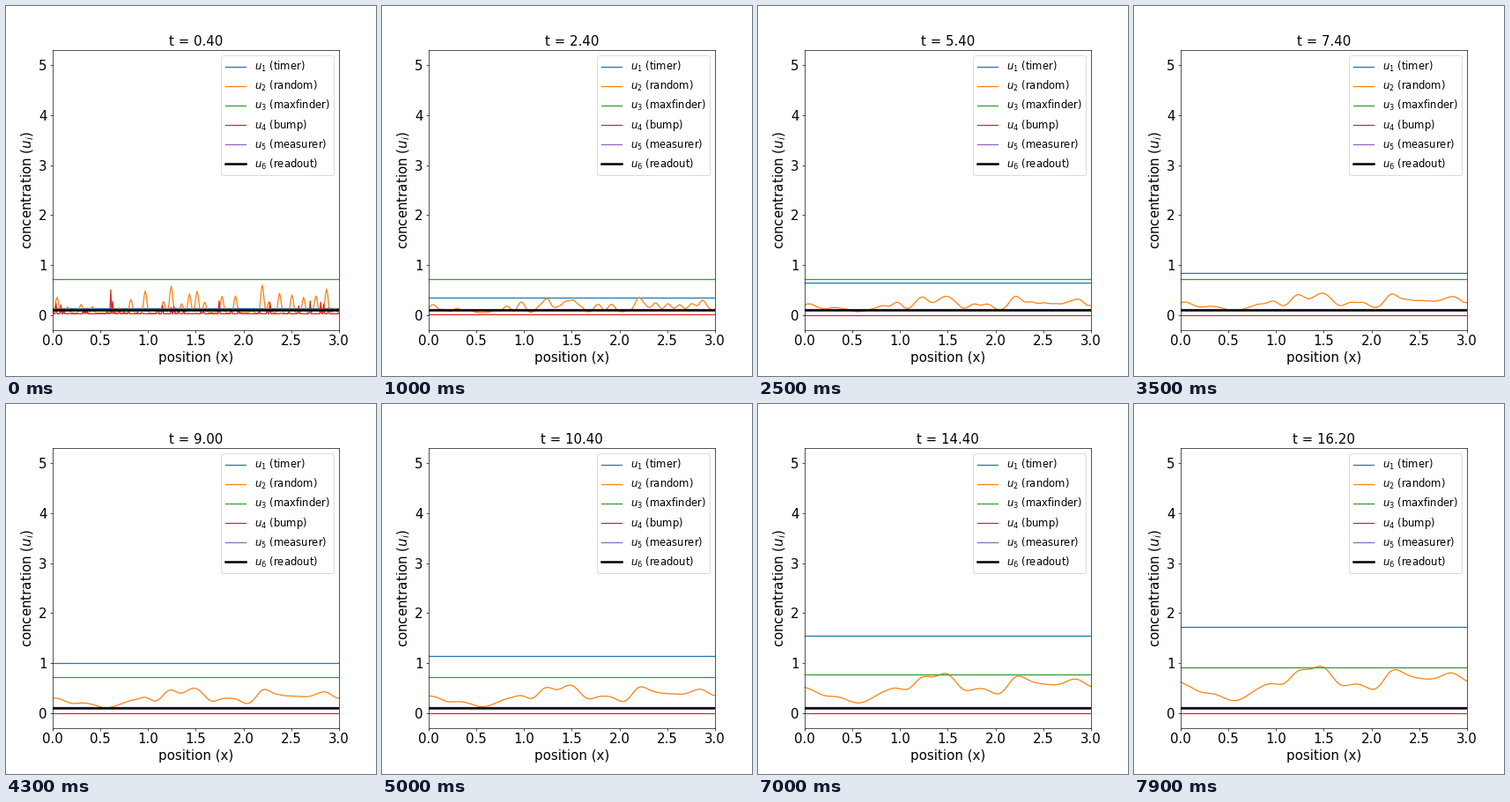
A matplotlib script for the animation above (8 s loop, 420x420 px).

```python
import numpy as np
import matplotlib.pyplot as plt
from matplotlib.animation import FuncAnimation

N, L = 300, 3.0
FRAMES, STEP, T0 = 80, 0.2, 0.4
GROWTH, DIFF = 0.1, 0.0003

rng = np.random.default_rng(4)
x = np.linspace(0, L, N)
k2 = (2 * np.pi * np.fft.fftfreq(N, L / N)) ** 2


def spread(u, dt, rate):
    """Periodic diffusion with exponential growth or decay over dt."""
    return np.fft.ifft(np.fft.fft(u) * np.exp((rate - DIFF * k2) * dt)).real


def add_spikes(u, spikes):
    for pos, height in spikes:
        u[round(pos / L * (N - 1))] += height
    return u


# Low noise with single-cell spikes (position, height) that diffuse into humps
random0 = add_spikes(0.06 * rng.random(N), [
    (0.05, 1.2), (0.16, 0.4), (0.30, 0.65), (0.42, 0.5), (0.70, 0.4),
    (0.82, 1.05), (0.97, 1.65), (1.16, 0.9), (1.24, 2.0), (1.35, 0.7),
    (1.43, 1.4), (1.52, 1.6), (1.60, 0.8), (1.78, 1.25), (1.92, 1.3),
    (2.09, 0.2), (2.20, 2.1), (2.27, 0.8), (2.38, 1.5), (2.51, 1.35),
    (2.63, 1.2), (2.76, 1.25), (2.87, 1.8), (2.96, 0.3)])
bump0 = add_spikes(0.28 * rng.random(N) ** 20, [(0.61, 0.45)])


def species(t):
    dt = t - T0
    u1 = 0.1 + 0.1 * t
    u2 = spread(random0, t, GROWTH)
    u3 = max(0.72, 0.98 * u2.max())
    u4 = 0.02 * np.exp(-1.5 * dt) + spread(bump0, dt, -3)
    return u1, u2, u3, u4, 0.115, 0.1


plt.rcParams.update({"font.family": "DejaVu Sans", "font.size": 18,
                     "axes.titlesize": 18})
fig, ax = plt.subplots(figsize=(7, 7), dpi=60)
fig.subplots_adjust(left=0.125, right=0.9, bottom=0.125, top=0.88)
ax.set(xlim=(0, L), ylim=(-0.3, 5.3), xlabel="position (x)",
       ylabel="concentration ($u_i$)")
title = ax.set_title("")

names = ["timer", "random", "maxfinder", "bump", "measurer", "readout"]
lines = [ax.plot(x, 0 * x, lw=1.5, label=f"$u_{i}$ ({name})")[0]
         for i, name in enumerate(names, 1)]
lines[-1].set(color="k", linewidth=3)
ax.legend(loc="upper right", fontsize=14)


def update(i):
    t = T0 + i * STEP
    for line, u in zip(lines, species(t)):
        line.set_ydata(np.broadcast_to(u, N))
    title.set_text(f"t = {t:.2f}")
    return [*lines, title]


anim = FuncAnimation(fig, update, frames=FRAMES, interval=100, repeat=True,
                     repeat_delay=0, blit=False)
plt.show()
```
